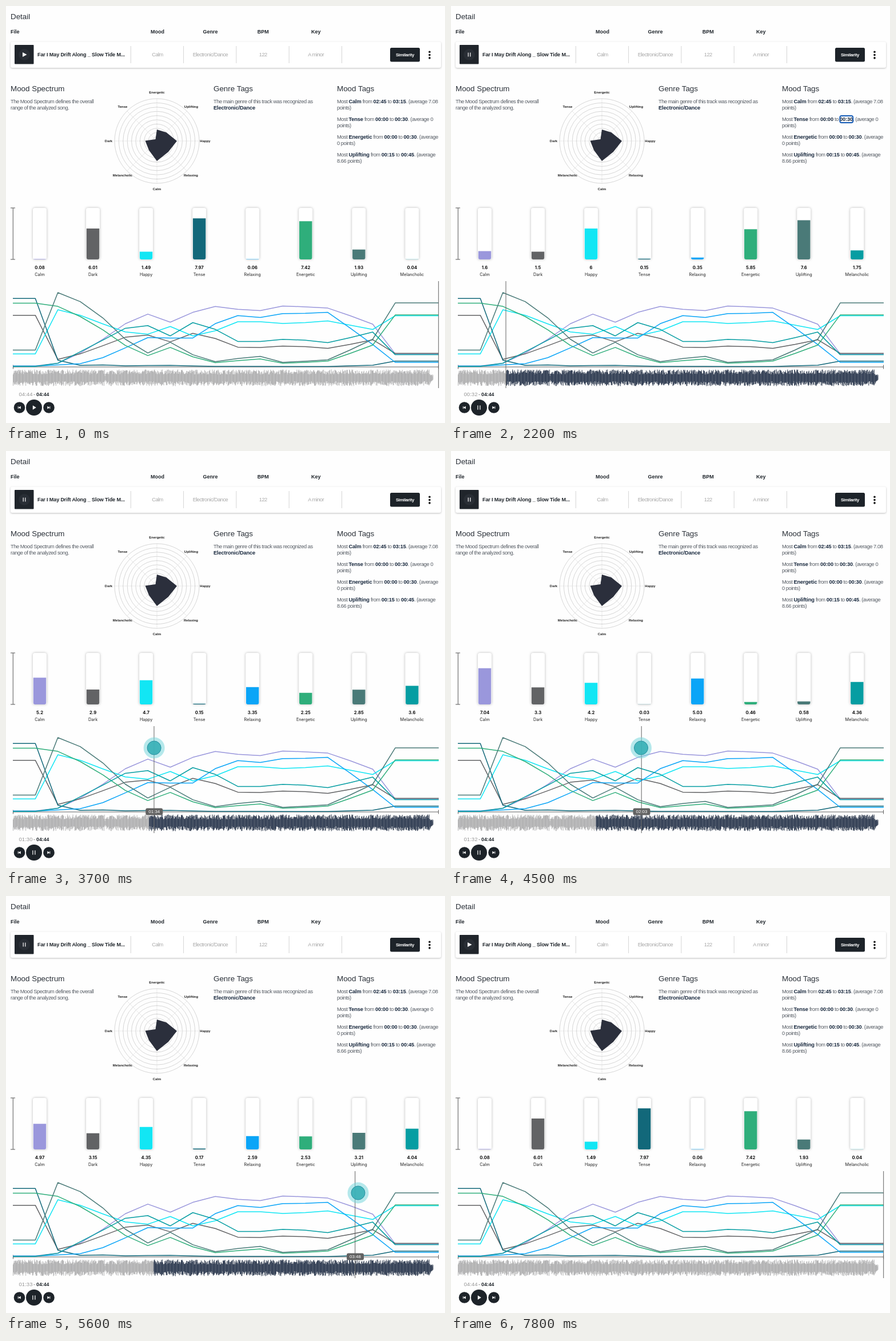
Write an HTML page that moves like this. It is 768 px wide and 729 px high and loops after 8000 ms.

```html
<!DOCTYPE html>
<html lang="en">
<head>
<meta charset="utf-8">
<title>Track detail</title>
<style>
html, body { margin: 0; width: 100%; height: 100%; overflow: hidden; background: #fefefe; }
svg { display: block; width: 768px; height: 729px; font-family: "Liberation Sans", Arial, sans-serif; }
text { white-space: pre; }
.head { font-size: 13.4px; fill: #2a3038; }
.body { font-size: 9.3px; letter-spacing: -.46px; fill: #555b63; }
.body .b { font-weight: 700; letter-spacing: -.15px; fill: #1a2a3f; }
.col { font-size: 9px; font-weight: 700; fill: #20262c; }
.cell { font-size: 9.3px; letter-spacing: -.55px; fill: #a9a9a9; }
.axis { font-size: 6px; font-weight: 700; fill: #222; }
.val { font: 700 7.7px Inter, sans-serif; fill: #111; }
.name { font: 7.3px Inter, sans-serif; fill: #222; }
.mid { text-anchor: middle; }
.soft { filter: drop-shadow(0 .5px 2px rgba(0, 0, 0, .28)); }
</style>
</head>
<body>
<svg id="stage" viewBox="0 0 768 729"></svg>
<script>
const stage = document.getElementById('stage');
const INK = '#1d2329', LEFT = 12, RIGHT = 757, BASE = 630.5, LENGTH = 284, LOOP = 8000;
const PX_PER_SEC = (RIGHT - LEFT) / LENGTH, STEP = 15 * PX_PER_SEC;

function el(tag, attrs = {}, parent = stage) {
  const node = document.createElementNS('http://www.w3.org/2000/svg', tag);
  for (const key in attrs) node.setAttribute(key, attrs[key]);
  return parent.appendChild(node);
}
// Parts between asterisks are bold.
function text(x, y, str, cls, attrs) {
  const node = el('text', { x, y, class: cls, ...attrs });
  str.split('*').forEach((part, i) => {
    if (part) el('tspan', i % 2 ? { class: 'b' } : {}, node).textContent = part;
  });
  return node;
}
const rect = (x, y, width, height, rx, fill, attrs) => el('rect', { x, y, width, height, rx, fill, ...attrs });
const circle = (cx, cy, r, fill, attrs) => el('circle', { cx, cy, r, fill, ...attrs });
const path = (d, stroke, width, attrs) => el('path', { d, stroke, fill: 'none', 'stroke-width': width, ...attrs });
const icon = d => el('path', { d, fill: '#fff' });
const show = (node, on) => node.setAttribute('visibility', on ? 'visible' : 'hidden');
const clock = s => [s / 60, s % 60].map(n => String(Math.floor(n)).padStart(2, '0')).join(':');

// Header and file row
text(8, 23, 'Detail', 'head');
text(8, 48, 'File', 'col');
rect(8, 62.5, 753, 45.5, 3, '#fff', { style: 'filter:drop-shadow(0 1px 1.5px rgba(0,0,0,.25))' });
['Mood', 'Genre', 'BPM', 'Key'].forEach((s, i) => text(265 + 92.4 * i, 48, s, 'col mid'));
['Calm', 'Electronic/Dance', '122', 'A minor'].forEach((s, i) => text(265 + 92.4 * i, 88.3, s, 'cell mid'));
for (let i = 0; i < 5; i++) path(`M${218.3 + 92.3 * i} 70V100`, '#d5d5d5', 1);
rect(15, 68, 33.5, 33.5, 1, '#20252b');
circle(32, 85, 10, '#292e35');
text(55, 88.3, 'Far I May Drift Along _ Slow Tide M...', 'col', { style: 'font-size:9.1px;letter-spacing:-.15px' });
rect(672, 73, 52, 24.5, 2.5, INK);
text(698, 88, 'Similarity', 'mid', { fill: '#fff', style: 'font-weight:700;font-size:7.8px;letter-spacing:-.3px' });
[80.3, 85.6, 90.9].forEach(y => circle(741, y, 1.8, '#111'));

// Text columns
text(8, 149, 'Mood Spectrum', 'head');
text(8, 170, 'The Mood Spectrum defines the overall', 'body');
text(8, 181, 'range of the analyzed song.', 'body');
text(363, 149, 'Genre Tags', 'head');
text(363, 170, 'The main genre of this track was recognized as', 'body');
text(363, 181, '*Electronic/Dance*', 'body');
text(579, 149, 'Mood Tags', 'head');
[['Most *Calm* from *02:45* to *03:15*. (average 7.08', 'points)'],
 ['Most *Tense* from *00:00* to *00:30*. (average 0', 'points)'],
 ['Most *Energetic* from *00:00* to *00:30*. (average', '0 points)'],
 ['Most *Uplifting* from *00:15* to *00:45*. (average', '8.66 points)']
].forEach((lines, i) => lines.forEach((s, j) => text(579, 170 + 31 * i + 11 * j, s, 'body')));
const ring = rect(0, 0, 23, 12, 3, 'none', { stroke: '#1259b5', 'stroke-width': 1.8 });

// Radar
const CX = 264, CY = 236;
for (let i = 1; i <= 10; i++) circle(CX, CY, 7.4 * i, 'none', { stroke: '#c4c4c4', 'stroke-width': .7 });
for (let i = 0; i < 4; i++)
  path(`M${CX - 74} ${CY}h148`, '#cfcfcf', .6, { 'stroke-dasharray': '2 1', transform: `rotate(${45 * i} ${CX} ${CY})` });
el('polygon', { points: '264,216 280.5,221 299,236 284,255 264,271 250,252 243.5,235.5 261.5,233', fill: '#2b2f3c' });
[['Energetic', 264, 152.5], ['Uplifting', 324, 177.5], ['Happy', 348.5, 238], ['Relaxing', 323.5, 297.5],
 ['Calm', 264, 322], ['Melancholic', 204, 297.5], ['Dark', 179.5, 238], ['Tense', 204, 177.5]
].forEach(([s, x, y]) => text(x, y, s, 'axis mid'));

// Mood scores, one per 15 seconds
const moods = [
  ['Calm', '#9a97dc', [.08, .4, 1.6, 3.2, 5.02, 6.15, 5.2, 6.35, 7.04, 6.7, 6.55, 7.1, 7, 6.85, 5.95, 4.97, 1.5]],
  ['Dark', '#626365', [6.01, .85, 1.5, 2.45, 3.44, 3.7, 2.9, 3.9, 3.3, 2.28, 2.25, 2.4, 2.34, 2.15, 2.6, 3.15, 1.55]],
  ['Happy', '#12e6f4', [1.49, 6.65, 6, 5, 4.06, 3.8, 4.7, 3.6, 4.2, 5.25, 5.25, 5.05, 5.16, 5.35, 4.85, 4.35, 5.95]],
  ['Tense', '#12687a', [7.97, .75, .15, .2, .1, .13, .15, .08, .03, .03, .03, .02, .02, .02, .1, .17, .65]],
  ['Relaxing', '#0ba5f7', [.06, .2, .35, 1.05, 2.2, 3.4, 3.35, 3.35, 5.03, 5.97, 5.75, 6.2, 6.24, 6.35, 4.5, 2.59, .5]],
  ['Energetic', '#2fae7b', [7.42, 7.05, 5.85, 4.3, 2.48, 1.3, 2.25, 1.15, .46, .7, .9, .4, .5, .65, 1.55, 2.53, 6.05]],
  ['Uplifting', '#4a7a78', [1.93, 8.66, 7.6, 5.7, 3.21, 1.6, 2.85, 1.4, .58, .95, 1.2, .5, .64, .8, 1.95, 3.21, 7.45]],
  ['Melancholic', '#069da2', [.04, .4, 1.75, 3.1, 4.49, 4.8, 3.6, 5.15, 4.36, 2.95, 2.95, 3.2, 3.1, 2.8, 3.4, 4.04, 1.4]]
];

// Bars
path('M8 353h8M8 443h8M12.3 353v90', '#555', 1);
const bars = moods.map(([name, color], i) => {
  const x = 59 + 93.05 * i;
  rect(x - 12, 353, 24, 90, 3.5, '#fff', { class: 'soft' });
  const fill = el('path', { fill: color });
  text(x, 472, name, 'name mid');
  const value = text(x, 460.3, '', 'val mid');
  return v => {
    const h = 9 * v, r = Math.min(3, h);
    fill.setAttribute('d', `M${x - 11.2} ${443 - h}h22.4v${h - r}q0 ${r} -3 ${r}h-16.4q-3 0 -3 ${-r}z`);
    value.textContent = v;
  };
});

// Line chart
path(`M${LEFT} 631H${RIGHT}M${LEFT + .5} 627.5v7M${RIGHT - .5} 627.5v7`, '#666', 1.1);
for (const [, color, data] of moods) {
  const pts = [data[0], ...data].map((v, i) => [LEFT + STEP * i, BASE - 14.95 * v]);
  pts.push([RIGHT, pts[pts.length - 1][1]]);
  path('M' + pts.map(p => p.map(n => n.toFixed(1))).join('L'), color, 1.5, { 'stroke-linejoin': 'round' });
}

// Waveform
let seed = 7;
const rnd = () => (seed = seed * 16807 % 2147483647) / 2147483647;
let wave = '';
for (let x = LEFT + .5; x < 747; x += .85) {
  const env = x > 741 ? (x > 744 ? .4 : .7) : Math.abs(x - 174) < 1.5 ? .5 : 1;
  const up = env * (6 + 8.5 * rnd()), down = env * (6 + 8.5 * rnd());
  wave += `M${x.toFixed(2)} ${(650 - up).toFixed(1)}V${(650 + down).toFixed(1)}`;
}
path(wave, '#9b9b9d', .75);
const clip = el('rect', { y: 630, width: 768, height: 40 }, el('clipPath', { id: 'ahead' }));
path(wave, '#1f2f47', .85, { 'clip-path': 'url(#ahead)' });

// Player
const elapsed = text(22.5, 682, '', 'cell', { style: 'font-size:9.6px;letter-spacing:0;fill:#999' });
text(48, 682, '-', 'cell', { style: 'fill:#666' });
text(53, 682, clock(LENGTH), 'col', { style: 'font-size:8.8px' });
circle(23.5, 702, 9.8, INK);
circle(49, 702, 14, INK);
circle(75, 702, 9.8, INK);
icon('M25.7 699.5v5l-4 -2.5zM20.8 699.7h.9v4.6h-.9zM72.4 699.5v5l4 -2.5zM76.4 699.7h.9v4.6h-.9z');
const playIcon = icon('M29 81v8l7.5 -4zM46.8 698.3v7.4l6 -3.7z');
const pauseIcon = icon('M29.6 81.5h1.2v7h-1.2zM33.2 81.5h1.2v7h-1.2zM46.3 698.3h1.2v7.4h-1.2zM50.3 698.3h1.2v7.4h-1.2z');

// Cursor, pointer and time tip
const cursor = path(`M0 481V668`, '#626262', 1);
const pointer = el('g');
el('circle', { r: 18.5, fill: '#7ad7dd', 'fill-opacity': .55 }, pointer);
el('circle', { r: 12, fill: '#36afb6', 'fill-opacity': .9, stroke: '#2790a0', 'stroke-width': 1 }, pointer);
const tip = el('g');
el('rect', { x: -15, y: 624.5, width: 30, height: 12, rx: 3, fill: '#626262' }, tip);
const tipText = el('text', { y: 633.4, class: 'mid', fill: '#fff', 'font-size': 8 }, tip);

// [time, seconds into the track, ring x, ring y]
const seeks = [[250, 0], [500, 165, 643.5, 161], [1000, 195.5, 677.5, 161], [1800, 31.5, 680.3, 192], [3600, 90.66], [6950, 282.8]];
const SPEED = 1.6 / 1000, END = 7650;
// [time, cursor x, pointer x]
const hover = [[2550, 330, 330], [2800, 213, 214], [3600, 250, 250], [4500, 333.5, 332.5], [5600, 611, 616],
               [6400, 709, 708], [6950, 754, 753], [7250, 755, 754]];

function hoverAt(t) {
  const i = hover.findIndex(k => k[0] > t);
  if (i < 1) return null;
  const a = hover[i - 1], b = hover[i], f = (t - a[0]) / (b[0] - a[0]);
  return [1, 2].map(k => a[k] + (b[k] - a[k]) * f);
}

function draw(t) {
  const playing = t >= seeks[0][0] && t < END;
  const seek = seeks.filter(s => s[0] <= t).pop();
  const pos = playing ? Math.min(LENGTH, seek[1] + (t - seek[0]) * SPEED) : LENGTH;
  const playX = LEFT + pos * PX_PER_SEC;
  const over = hoverAt(t);
  const x = over ? over[0] : playX;

  show(playIcon, !playing);
  show(pauseIcon, playing);
  elapsed.textContent = clock(pos);
  clip.setAttribute('x', playX);
  cursor.setAttribute('transform', `translate(${x - .3})`);

  const ringed = playing && seek.length > 2;
  show(ring, ringed);
  if (ringed) {
    ring.setAttribute('x', seek[2]);
    ring.setAttribute('y', seek[3]);
  }

  show(pointer, over);
  show(tip, over);
  if (over) {
    pointer.setAttribute('transform', `translate(${over[1]} 519)`);
    tip.setAttribute('transform', `translate(${x})`);
    tipText.textContent = clock(Math.round((x - LEFT) / PX_PER_SEC));
  }

  // Past the last section the bars fall back to the first one.
  const section = Math.ceil((x - LEFT) / STEP - .14);
  bars.forEach((set, i) => {
    const data = moods[i][2];
    set(section >= 1 && section <= data.length ? data[section - 1] : data[0]);
  });
}

const start = performance.now();
function tick() {
  draw(Math.floor((performance.now() - start) % LOOP / 50) * 50);
  requestAnimationFrame(tick);
}
tick();
</script>
</body>
</html>
```
